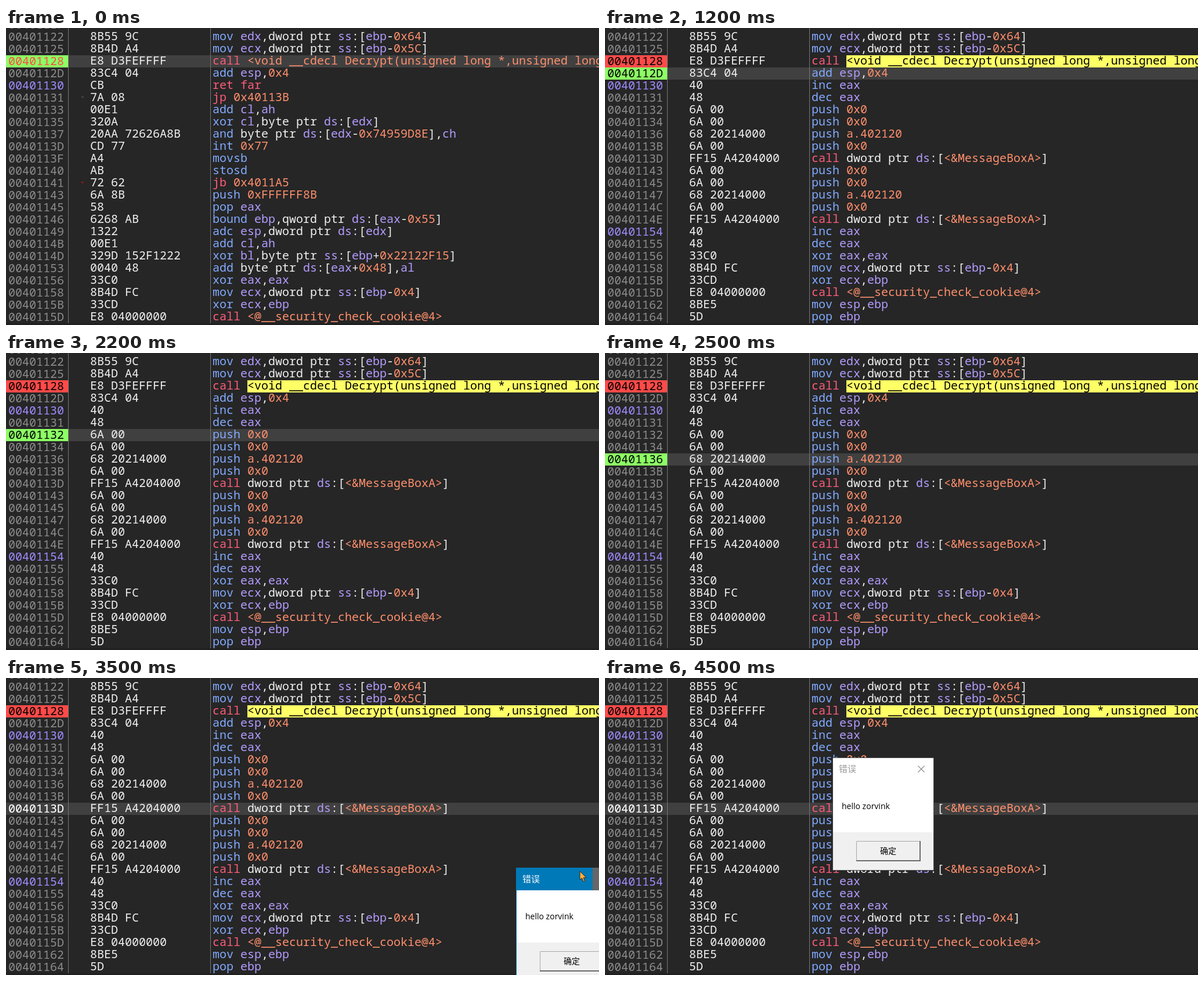
These frames come from a looping animation (1022x512 px, 4600 ms). An HTML page:

```html
<!DOCTYPE html>
<html lang="en">
<head>
<meta charset="utf-8">
<title>Stepping through decrypted code</title>
<style>
  html, body { margin: 0; width: 100%; height: 100%; overflow: hidden; background: #262626; }
  svg { display: block; }
  text { white-space: pre; fill: #f0f0f0; font: 20px "Noto Sans Mono", "DejaVu Sans Mono", monospace; }
  .addr { fill: #8c8c8c; }
  .label { fill: #a08cff; }
  .stop { fill: #000; }
  .op { fill: #82aaff; }
  .flow { fill: #ff5c7a; }
  .reg { fill: #b49cff; }
  .num { fill: #ff8f6c; }
  #current text { fill: inherit; }
  #dialog text { font: 15px "Noto Sans CJK SC", "Noto Sans CJK", sans-serif; fill: #000; }
  #dialog #message { font: 14px "Open Sans", "Noto Sans", sans-serif; }
  #dialog #ok { font-size: 14px; text-anchor: middle; }
  #active text { fill: #fff !important; }
  #inactive text { fill: #999 !important; }
  .cross { fill: none; stroke-width: 1.1; }
</style>
</head>
<body>
<svg width="1022" height="512" viewBox="0 0 1022 512">
  <defs>
    <clipPath id="window"><rect id="slot" width="107" height="21"/></clipPath>
    <path id="arrow" d="M0 0V15L3.6 12L6.2 18L8.6 17L6.2 11.2H11Z"/>
    <path id="cross" d="M147.5 14.5l11 11m0-11l-11 11"/>
  </defs>

  <rect width="1022" height="512" fill="#262626"/>
  <rect y="509" width="1022" height="3" fill="#202020"/>
  <rect id="bar" width="1022" height="21" fill="#404040"/>
  <rect id="breakpoint" y="47" width="107" height="21" fill="#ff4a48"/>
  <rect id="hot" x="416" y="47" width="606" height="21" fill="#ffff66"/>

  <g id="shared"></g>
  <g id="before">
    <path d="M129 118h6l-3 3z" fill="#484848"/>
    <path d="M129 265h6l-3 3z" fill="#a01414"/>
  </g>
  <g id="after"></g>

  <g id="current" clip-path="url(#window)">
    <rect id="green" width="107" height="512" fill="#8cff64"/>
  </g>
  <path d="M107.5 0V509M352.5 0V509" stroke="#777"/>

  <g id="popup"><rect x="613" y="105" width="409" height="407" fill="#262626"/></g>
  <use id="pointer" href="#arrow" fill="#fff" stroke="#1c2c66"/>

  <rect id="trail" x="879" y="509" width="143" height="3" fill="#f0f0f0"/>
  <g id="dialog">
    <g id="inactive">
      <rect width="175" height="195" fill="#4a4a4a"/>
      <rect x="1" y="1" width="173" height="128" fill="#fff"/>
      <text x="11" y="25">错误</text>
      <use href="#cross" class="cross" stroke="#8a8a8a"/>
    </g>
    <g id="active">
      <rect width="175" height="195" fill="#0079b8"/>
      <rect x="132" width="43" height="39" fill="#666"/>
      <rect x="1" y="39" width="173" height="90" fill="#fff"/>
      <text x="11" y="25">错误</text>
      <use href="#cross" class="cross" stroke="#fff"/>
    </g>
    <rect x="1" y="129" width="173" height="65" fill="#f0f0f0"/>
    <path d="M41.5 179V144.5H152" fill="none" stroke="#a8a8a8"/>
    <path d="M151 144V178H41" fill="none" stroke="#6a6a6a" stroke-width="2"/>
    <text id="message" x="16" y="89">hello zorvink</text>
    <text id="ok" x="96" y="166">确定</text>
    <use id="grip" href="#arrow" x="110" y="6" fill="#ffb040" stroke="#222"/>
  </g>
</svg>

<script>
const LOOP = 4600;
const SIGNATURE = '<void __cdecl Decrypt(unsigned long *,unsigned long *)>';
const $ = id => document.getElementById(id);
const rowTop = row => 5 + 21 * row;

// Listing lines: address|bytes|instruction; * marks a labelled address, ! a breakpoint.
const shared = `00401122|8B55 9C|mov edx,dword ptr ss:[ebp-0x64]
00401125|8B4D A4|mov ecx,dword ptr ss:[ebp-0x5C]
!00401128|E8 D3FEFFFF|call ${SIGNATURE}
0040112D|83C4 04|add esp,0x4`;

const before = `*00401130|CB|ret far
00401131|7A 08|jp 0x40113B
00401133|00E1|add cl,ah
00401135|320A|xor cl,byte ptr ds:[edx]
00401137|20AA 72626A8B|and byte ptr ds:[edx-0x74959D8E],ch
0040113D|CD 77|int 0x77
0040113F|A4|movsb
00401140|AB|stosd
00401141|72 62|jb 0x4011A5
00401143|6A 8B|push 0xFFFFFF8B
00401145|58|pop eax
00401146|6268 AB|bound ebp,qword ptr ds:[eax-0x55]
00401149|1322|adc esp,dword ptr ds:[edx]
0040114B|00E1|add cl,ah
0040114D|329D 152F1222|xor bl,byte ptr ss:[ebp+0x22122F15]
00401153|0040 48|add byte ptr ds:[eax+0x48],al
00401156|33C0|xor eax,eax
00401158|8B4D FC|mov ecx,dword ptr ss:[ebp-0x4]
0040115B|33CD|xor ecx,ebp
0040115D|E8 04000000|call <@__security_check_cookie@4>`;

const after = `*00401130|40|inc eax
00401131|48|dec eax
00401132|6A 00|push 0x0
00401134|6A 00|push 0x0
00401136|68 20214000|push a.402120
0040113B|6A 00|push 0x0
0040113D|FF15 A4204000|call dword ptr ds:[<&MessageBoxA>]
00401143|6A 00|push 0x0
00401145|6A 00|push 0x0
00401147|68 20214000|push a.402120
0040114C|6A 00|push 0x0
0040114E|FF15 A4204000|call dword ptr ds:[<&MessageBoxA>]
*00401154|40|inc eax
00401155|48|dec eax
00401156|33C0|xor eax,eax
00401158|8B4D FC|mov ecx,dword ptr ss:[ebp-0x4]
0040115B|33CD|xor ecx,ebp
0040115D|E8 04000000|call <@__security_check_cookie@4>
00401162|8BE5|mov esp,ebp
00401164|5D|pop ebp`;

const tooltip = `push ebp
mov ebp,esp
sub esp,20
push esi
push edi
push 1C
lea eax,dword ptr ss:[ebp-20]
mov esi,ecx
push eax
push esi
mov edi,edx
call dword ptr ds:[<&VirtualQuery>]
lea eax,dword ptr ss:[ebp-C]
push eax
push 4
push dword ptr ss:[ebp-14]
push dword ptr ss:[ebp-20]
call dword ptr ds:[<&VirtualProtect>]
shr edi,2
test edi,edi`;

function add(parent, tag, attrs, content = '') {
  const el = document.createElementNS('http://www.w3.org/2000/svg', tag);
  for (const name in attrs) el.setAttribute(name, attrs[name]);
  el.textContent = content;
  return parent.appendChild(el);
}

const write = (parent, x, y, content, cls = '') =>
  add(parent, 'text', { x, y, class: cls }, content);

const TOKEN = /(^ret far|^(?:call|jp|jb)\b)|(^[a-z]+)|(<[^\]]+)|\b(e?[abcd]x|[abcd][lh]|e[sd]i|e[sb]p|[sd]s)\b|\b(0x[0-9A-F]+|a\.\d+|[0-9A-F]+)\b/g;
const CLASSES = ['flow', 'op', 'num', 'reg', 'num'];

function writeCode(parent, x, y, code) {
  const line = write(parent, x, y, '');
  let end = 0;
  for (const match of code.matchAll(TOKEN)) {
    line.append(code.slice(end, match.index));
    const kind = match.slice(1).findIndex(group => group !== undefined);
    const span = add(line, 'tspan', { class: CLASSES[kind] }, match[0]);
    if (match[0] === SIGNATURE) span.id = 'signature';
    end = match.index + match[0].length;
  }
  line.append(code.slice(end));
}

function writeListing(parent, source, first) {
  source.split('\n').forEach((line, i) => {
    const [mark, bytes, code] = line.split('|');
    const top = rowTop(first + i);
    const address = mark.replace(/[*!]/, '');
    const cls = mark[0] === '*' ? 'label' : mark[0] === '!' ? 'stop' : 'addr';
    write(parent, 4, top + 17, address, cls);
    write(parent, 145, top + 16, bytes);
    writeCode(parent, 356, top + 16, code);
    if (parent.id !== 'before') write($('current'), 4, top + 17, address);
  });
}

write($('shared'), 4, 1, '0040111F', 'addr');
writeListing($('shared'), shared, 0);
writeListing($('before'), before, 4);
writeListing($('after'), after, 4);
write($('popup'), 616, 124, '00401000 <a.void __cdecl Decrypt(unsigned long', 'reg');
tooltip.split('\n').forEach((code, i) => writeCode($('popup'), 616, 143 + 20 * i, code));

// Held CSS keyframes from [time in ms, value] pairs.
let css = '';
function track(ids, prop, steps) {
  const name = ids[0] + '-' + prop;
  const frames = steps.map(([t, value]) =>
    `${Math.max(0, t / LOOP * 100 - 0.02).toFixed(3)}% { ${prop}: ${value} }`);
  css += `@keyframes ${name} { ${frames.join(' ')} }\n`;
  for (const id of ids) (tracks[id] ||= []).push(`${name} ${LOOP}ms step-end infinite`);
}
const tracks = {};

const show = (id, from, to = LOOP) => track([id], 'visibility', [
  [0, from ? 'hidden' : 'visible'],
  ...(from ? [[from, 'visible']] : []),
  ...(to < LOOP ? [[to, 'hidden']] : [])
]);
const move = (ids, steps) => track(ids, 'transform',
  steps.map(([t, x, y]) => [t, `translate(${x}px, ${y}px)`]));

move(['bar', 'slot'], [[0, 2], [1200, 3], [1500, 4], [2000, 5], [2200, 6], [2300, 7],
  [2500, 8], [2600, 9], [2700, 10]].map(([t, row]) => [t, 0, rowTop(row)]));
track(['current'], 'fill', [[0, '#ff4a48'], [1200, '#000'], [3100, '#fff']]);
track(['signature'], 'fill', [[0, '#ff8f6c'], [600, '#000']]);
show('green', 0, 3100);
show('breakpoint', 1200);
show('hot', 600);
show('before', 0, 1200);
show('after', 1200);
show('popup', 600, 900);
show('pointer', 200, 900);
move(['pointer'], [[0, 598, 71], [300, 594, 63], [400, 591, 57]]);

const drag = [[3600, 0.12], [3700, 0.4], [3800, 0.7], [3900, 0.92], [4000, 1]]
  .map(([t, k]) => [t, Math.round(879 - 483 * k), Math.round(327 - 189 * k)]);
move(['dialog'], [[0, 879, 327], ...drag, [4100, 392, 137]]);
show('dialog', 3100);
show('active', 3100, 4500);
show('inactive', 4500);
show('grip', 3500, 4200);
show('trail', 3600, 4100);

for (const id in tracks) css += `#${id} { animation: ${tracks[id].join(', ')} }\n`;
add(document.querySelector('svg'), 'style', {}, css);
</script>
</body>
</html>
```
